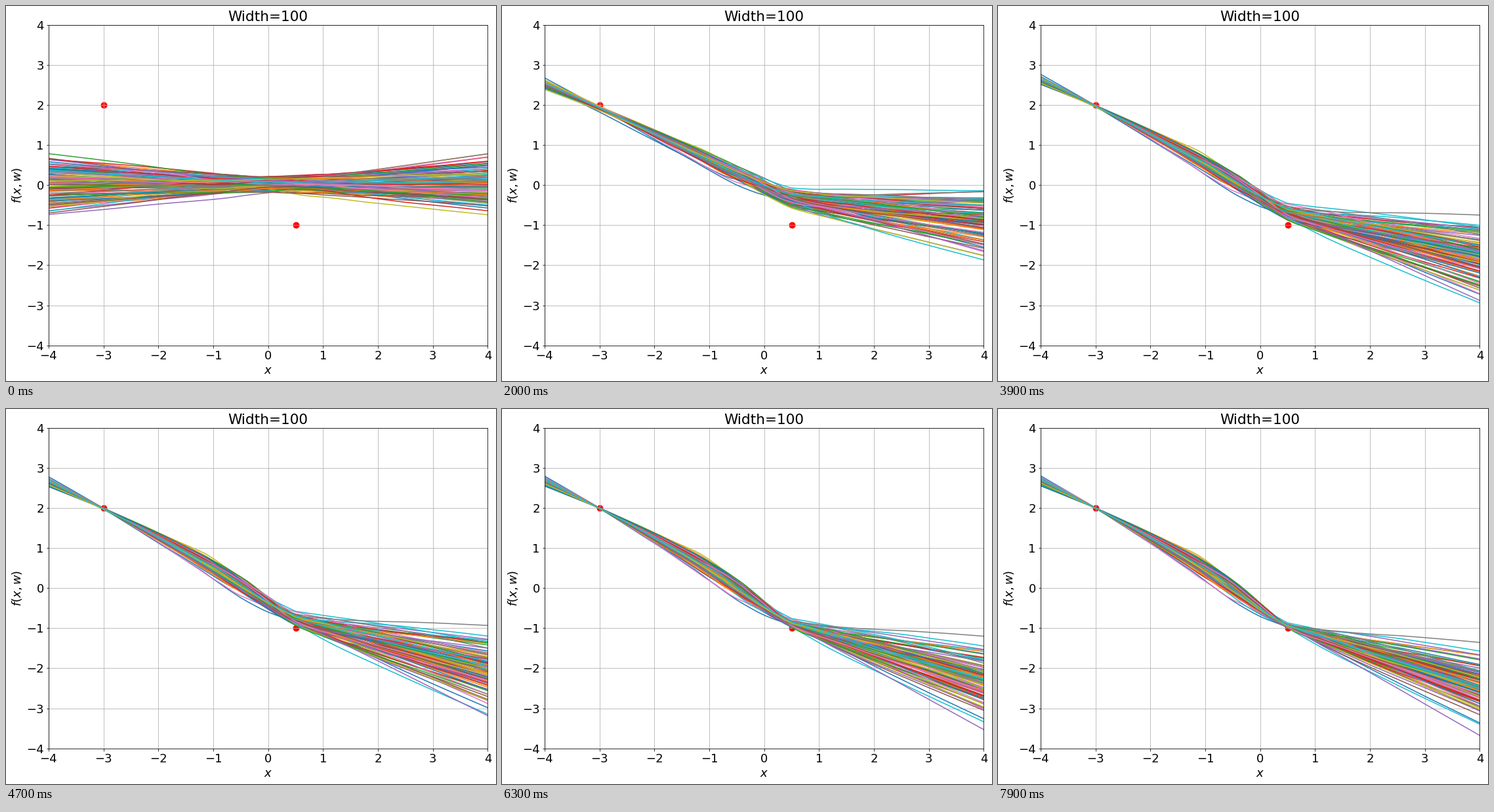
Write a matplotlib script that moves like this. It is 747 px wide and 572 px high and loops after 8000 ms.

```python
import numpy as np
import matplotlib.pyplot as plt
from matplotlib.animation import FuncAnimation
from matplotlib.collections import LineCollection

W, H, DPI = 747, 572, 72
FRAMES, HOLD = 80, 4          # the first picture rests before training starts
NETS, WIDTH, RATE = 100, 100, 0.005

rng = np.random.default_rng(7)


def uniform(bound, *shape):
    return rng.uniform(-bound, bound, (NETS, *shape)).astype(np.float32)


def column(*values):
    return np.array(values, np.float32)[:, None]


def flip(a):
    return a.transpose(0, 2, 1)


# An ensemble of small ReLU networks, 1 - WIDTH - WIDTH - 1
bound = WIDTH ** -0.5
w1, b1 = uniform(1, 1, WIDTH), uniform(1, 1, WIDTH)
w2, b2 = uniform(bound, WIDTH, WIDTH), uniform(bound, 1, WIDTH)
w3, b3 = uniform(bound, WIDTH, 1), uniform(bound, 1, 1)


def forward(x):
    h1 = np.maximum(x * w1 + b1, 0)
    h2 = np.maximum(h1 @ w2 + b2, 0)
    return h1, h2, h2 @ w3 + b3


def limit_start():
    """Softly bound the first heights at the edges and in the middle."""
    _, h2, out = forward(column(-4, 0, 4))
    limit = column(1.1, 0.25, 1)
    goal = limit * np.tanh(out / limit)
    w3[...] += flip(h2) @ np.linalg.solve(h2 @ flip(h2), goal - out)


def descend(x, y):
    """One gradient step on the squared error, for all networks at once."""
    h1, h2, out = forward(x)
    err = out - y
    d2 = (h2 > 0) * (err @ flip(w3))
    d1 = (h1 > 0) * (d2 @ flip(w2))
    for weight, bias, inp, d in ((w3, b3, flip(h2), err),
                                 (w2, b2, flip(h1), d2),
                                 (w1, b1, x.T, d1)):
        weight[...] -= RATE * (inp @ d)
        bias[...] -= RATE * d.sum(axis=1, keepdims=True)


px, py = column(-3, 0.5), column(2, -1)
grid = np.linspace(-4, 4, 65, dtype=np.float32)[:, None]

limit_start()
history = []
for step in range(FRAMES - HOLD):
    if step:
        descend(px, py)
    history.append(forward(grid)[2][:, :, 0])

plt.rcParams["font.size"] = 18
fig = plt.figure(figsize=(W / DPI, H / DPI), dpi=DPI)
ax = fig.add_axes([64.85 / W, 54.25 / H, 669.6 / W, 489.24 / H])
ax.set(xlim=(-4, 4), ylim=(-4, 4), xlabel="$x$", ylabel="$f(x, w)$",
       title="Width=100", xticks=range(-4, 5), yticks=range(-4, 5))
ax.grid()
ax.scatter(px, py, s=80, color="red")

lines = LineCollection([], colors=plt.cm.tab10.colors, linewidths=1.5, zorder=2)
ax.add_collection(lines, autolim=False)


def draw(frame):
    curves = history[max(0, frame - HOLD)]
    lines.set_segments([np.column_stack((grid[:, 0], c)) for c in curves])
    return lines,


anim = FuncAnimation(fig, draw, frames=FRAMES, interval=100, repeat=True,
                     repeat_delay=0)
plt.show()
```
